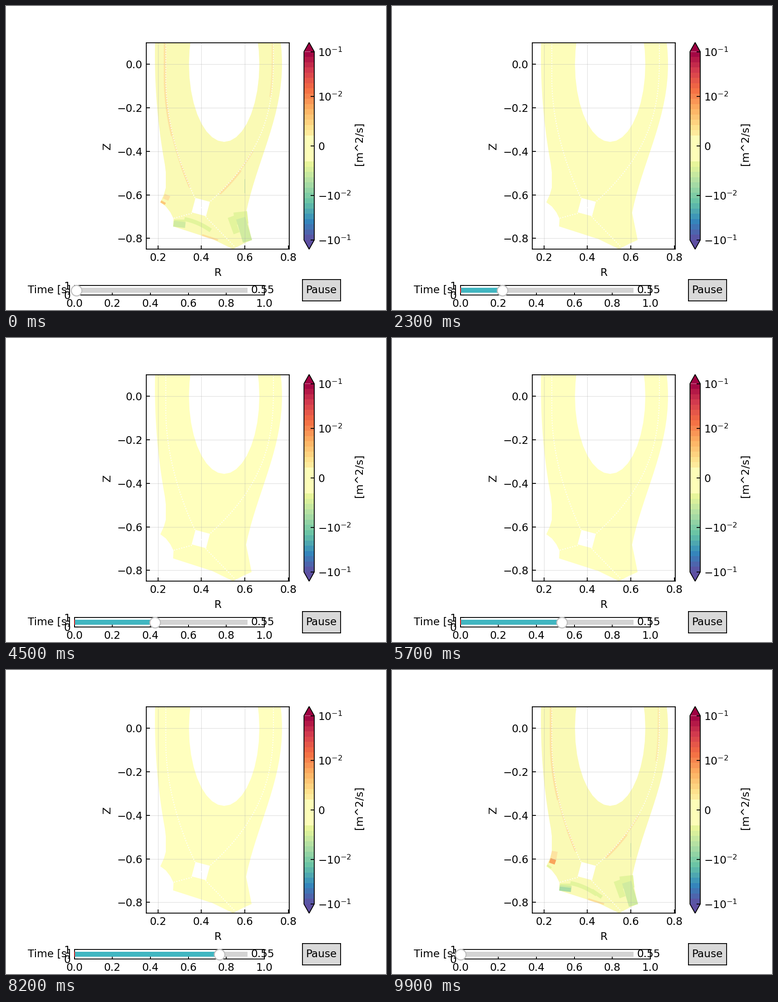
Recreate the animation shown at these times as a matplotlib script. Size 837x669 px, loop 10000 ms.

```python
import numpy as np
import matplotlib.pyplot as plt
from matplotlib.animation import FuncAnimation
from matplotlib.patches import Polygon, Rectangle

W, H, DPI = 837, 669, 160
STEPS = 100
S = 167.3 / DPI  # point scale

plt.rcParams.update({
    "font.family": "DejaVu Sans",
    "font.size": 10 * S,
    "axes.linewidth": 0.8 * S,
    "axes.labelpad": 4 * S,
    "toolbar": "None",
})
for k in ("xtick", "ytick"):
    plt.rcParams.update({
        k + ".direction": "in",
        k + ".major.width": 0.8 * S,
        k + ".major.size": 3.5 * S,
        k + ".major.pad": 3.5 * S,
    })

fig = plt.figure(figsize=(W / DPI, H / DPI), dpi=DPI, facecolor="white")


def box(left, top, right, bottom, z):
    """Axes placed by pixel edges, y counted from the top."""
    return fig.add_axes([left / W, 1 - bottom / H, (right - left) / W, (bottom - top) / H],
                        facecolor="none", zorder=z)


def stage(left, top, right, bottom, z):
    """Bare axes whose data units are pixels."""
    a = box(left, top, right, bottom, z)
    a.set(xlim=(left, right), ylim=(bottom, top))
    a.axis("off")
    return a


VIEW = (308.7, 80.8, 624.2, 535.2)
back = stage(*VIEW, 0)
front = stage(0, 0, W, H, 5)


def pt(px):
    return px * 72 / DPI


def poly(a, color, x, y, **kw):
    return a.add_patch(Polygon(np.column_stack([x, y]), fc=color, lw=0, **kw))


def strip(color, width, x, y):
    return back.plot(x, y, color=color, lw=pt(width), solid_capstyle="butt",
                     scalex=False, scaley=False)[0]


# plasma cross-section: wall and separatrix as x(y)
def rise(y, start, span, power):
    return (np.maximum(y - start, 0) / span) ** power


def wall_in(y):
    return np.minimum(328 + 24 * ((y - 110) / 250) ** 2, 352)


def wall_out(y):
    return 608 - 44 * (1 - np.cos((y - 128) / 131))


def sep_in(y):
    return 352 + 63 * rise(y, 160, 260, 1.9)


def sep_out(y):
    return 589 - 139 * rise(y, 110, 320, 2.58)


PLATES = np.array([(348, 414), (340, 432), (352, 441), (362, 454), (369, 468), (368, 485),
                   (455, 513), (500, 535), (523, 523), (541, 515), (536, 490)])
y_in, y_out = np.linspace(78, 400, 20), np.linspace(455, 78, 20)
body = poly(back, "#ffffbe",
            np.concatenate([wall_in(y_in), PLATES[:, 0], wall_out(y_out)]),
            np.concatenate([y_in, PLATES[:, 1], y_out]), zorder=1)
t = np.linspace(0, 2 * np.pi, 37)
poly(back, "white", 480.5 + 77.5 * np.cos(t), 128 + 171 * np.sin(t), zorder=4)
t = np.pi / 3 + np.pi / 2 * np.arange(4)
poly(back, "white", 429 + 23.2 * np.cos(t), 442.5 + 23.2 * np.sin(t), zorder=4)

AMBER, PALE, ORANGE = "#fde3a0", "#fcecaa", "#fdc778"
LIME, GREEN, TEAL = "#e3f49c", "#d0eba0", "#a8dba4"


def band(curve, color, width, y0, y1, dx):
    y = np.linspace(y0, y1, 15)
    return strip(color, width, curve(y) + dx, y)


def spot(color, width, x0, y0, x1, y1):
    return strip(color, width, [x0, x1], [y0, y1])


u = np.linspace(0, 1, 12)
fading = [
    band(sep_in, AMBER, 5, 80, 286, -2),
    band(sep_in, PALE, 4, 286, 350, -1),
    band(sep_in, AMBER, 4, 350, 399, -1),
    band(sep_out, PALE, 4, 80, 200, -2),
    band(sep_out, PALE, 4, 319, 362, 1),
    band(sep_out, AMBER, 5, 362, 413, 3),
    spot(LIME, 14, 495, 464, 508, 500),
    spot(LIME, 30, 516, 453, 519, 480),
    spot(GREEN, 21, 517, 467, 532, 518),
    spot(LIME, 5, 370, 472, 395, 472),
    spot(GREEN, 13, 369, 479, 395, 482),
    strip(LIME, 9, 393 + 58 * u, 469 + 10 * u + 15 * u ** 2),
    spot("#fde09a", 4, 432, 504, 467, 515),
]
after = [
    spot(AMBER, 13, 356, 416, 351.5, 426),
    spot(ORANGE, 5, 341, 430, 351, 435.5),
]
start = [
    spot(AMBER, 13, 358.5, 399, 355.5, 416),
    spot("#f9a45c", 13, 355.5, 416, 352, 426),
    spot(LIME, 4, 342, 430, 351, 435.5),
    spot(LIME, 8, 440, 485, 462, 500),
    spot(TEAL, 9, 369, 481, 394, 484),
]
sliver = spot("#cfe9a6", 1.5, 526, 381, 526, 412)

# main plot
SCALE, X02, Y0 = 479, 334.5, 128.2  # px per unit, px of R=0.2 and Z=0
left, top, right, bottom = VIEW
ax = box(*VIEW, 2)
ax.set(xlim=(0.2 + (left - X02) / SCALE, 0.2 + (right - X02) / SCALE),
       ylim=((Y0 - bottom) / SCALE, (Y0 - top) / SCALE), xlabel="R", ylabel="Z",
       xticks=np.arange(2, 9, 2) / 10, yticks=np.arange(-8, 1, 2) / 10)
ax.grid(color="#b0b0b0", alpha=0.4, lw=0.5 * S)
ax.set_axisbelow(True)

y1, y2 = np.linspace(81, 420, 40), np.linspace(81, 430, 40)
LEGS = [
    (np.append(sep_in(y1), 430), np.append(y1, 443)),
    (np.append(sep_out(y2), 430), np.append(y2, 443)),
    ([370, 410, 430], [467, 456, 443]),
    ([430, 441, 505], [443, 465, 531]),
]
for x, y in LEGS:
    ax.plot(x, y, ":", color="white", lw=0.9 * S, transform=back.transData,
            scalex=False, scaley=False)

# colour bar, symmetric log scale
cax = box(656.3, 100.5, 679, 515, 2)
cmap = plt.get_cmap("Spectral_r")
N = 36
for k in range(N):
    color = "#fdfdb8" if 15 <= k < 20 else cmap((k + 0.5) / N)
    cax.add_patch(Rectangle((0, 2 * k / N - 1), 1, 2 / N, fc=color, lw=0,
                            antialiased=False))
TIP = 1.0975
for sign in (1, -1):
    poly(cax, cmap((sign + 1) / 2), [0, 0.5, 1], [sign, sign * TIP, sign], clip_on=False)
cax.add_patch(Polygon([(0, 1), (0.5, TIP), (1, 1), (1, -1), (0.5, -TIP), (0, -1)],
                      fill=False, ec="black", lw=0.8 * S, clip_on=False, zorder=3))
cax.spines[:].set_visible(False)
cax.yaxis.tick_right()
cax.yaxis.set_label_position("right")
cax.set(xlim=(0, 1), ylim=(-1, 1), xticks=[])
lin = 10 / 19  # position of 10^-2
cax.set_yticks([1, lin, 0, -lin, -1],
               [r"$\mathdefault{%s}$" % s
                for s in ("10^{-1}", "10^{-2}", "0", "-10^{-2}", "-10^{-1}")])
cax.set_ylabel("[m^2/s]", y=0.5115, labelpad=2.9)

# time slider
LEFT, RIGHT, MID = 0.18 * W, 531.7, 0.935 * H
LENGTH, THICK = RIGHT - LEFT, 0.015 * H
sax = box(LEFT, 0.92 * H, 0.68 * W, 0.95 * H, 2)
sax.set(xticks=np.linspace(0, 1, 6), yticks=[0, 1], yticklabels=["0", "1"],
        xlim=(0, 1), ylim=(0, 1))
front.text(LEFT - 0.02 * LENGTH, MID, "Time [s]", ha="right", va="center")
front.text(RIGHT + 0.02 * LENGTH, MID, "0.55", ha="left", va="center")
track, bar = [front.add_patch(Rectangle((LEFT, MID - THICK / 2), LENGTH, THICK, fc=c, lw=0))
              for c in ("lightgrey", "#41b6c1")]
front.plot([LEFT, LEFT], [MID - THICK / 2, MID + THICK / 2], color="red", lw=pt(1.5),
           solid_capstyle="butt")
knob, = front.plot([LEFT], [MID], "o", ms=10 * S, mfc="white", mec="0.75",
                   mew=1.0 * S, zorder=6)

# button
button = box(0.78 * W, 0.9 * H, 0.88 * W, 0.97 * H, 2)
button.set(xticks=[], yticks=[], facecolor="0.85")
button.text(0.5, 0.5, "Pause", ha="center", va="center", transform=button.transAxes)

DIM, BRIGHT = np.array([250, 250, 181]) / 255, np.array([255, 255, 190]) / 255


def draw(i):
    n = (i + 1) % STEPS
    x = LEFT + LENGTH * n / (STEPS - 1)
    knob.set_xdata([x])
    bar.set_width(x - LEFT)

    body.set_facecolor(DIM + (BRIGHT - DIM) * min(1, n / 50) ** 0.8)
    age = max(n - 1, 0)
    fade = float(np.exp(-(age / 5) ** 2))
    for p in fading + after:
        p.set_alpha(fade)
    for p in after:
        p.set_visible(n > 0)
    for p in start:
        p.set_visible(n == 0)

    # thin sliver drifting down while it shrinks
    v = age / 13
    mid, half = 396.5 + 60.5 * v, max(15.5 - 9.5 * v, 0)
    sliver.set_ydata([mid - half, mid + half])
    return []


anim = FuncAnimation(fig, draw, frames=STEPS, interval=100, repeat=True,
                     repeat_delay=0, blit=False)
plt.show()
```
